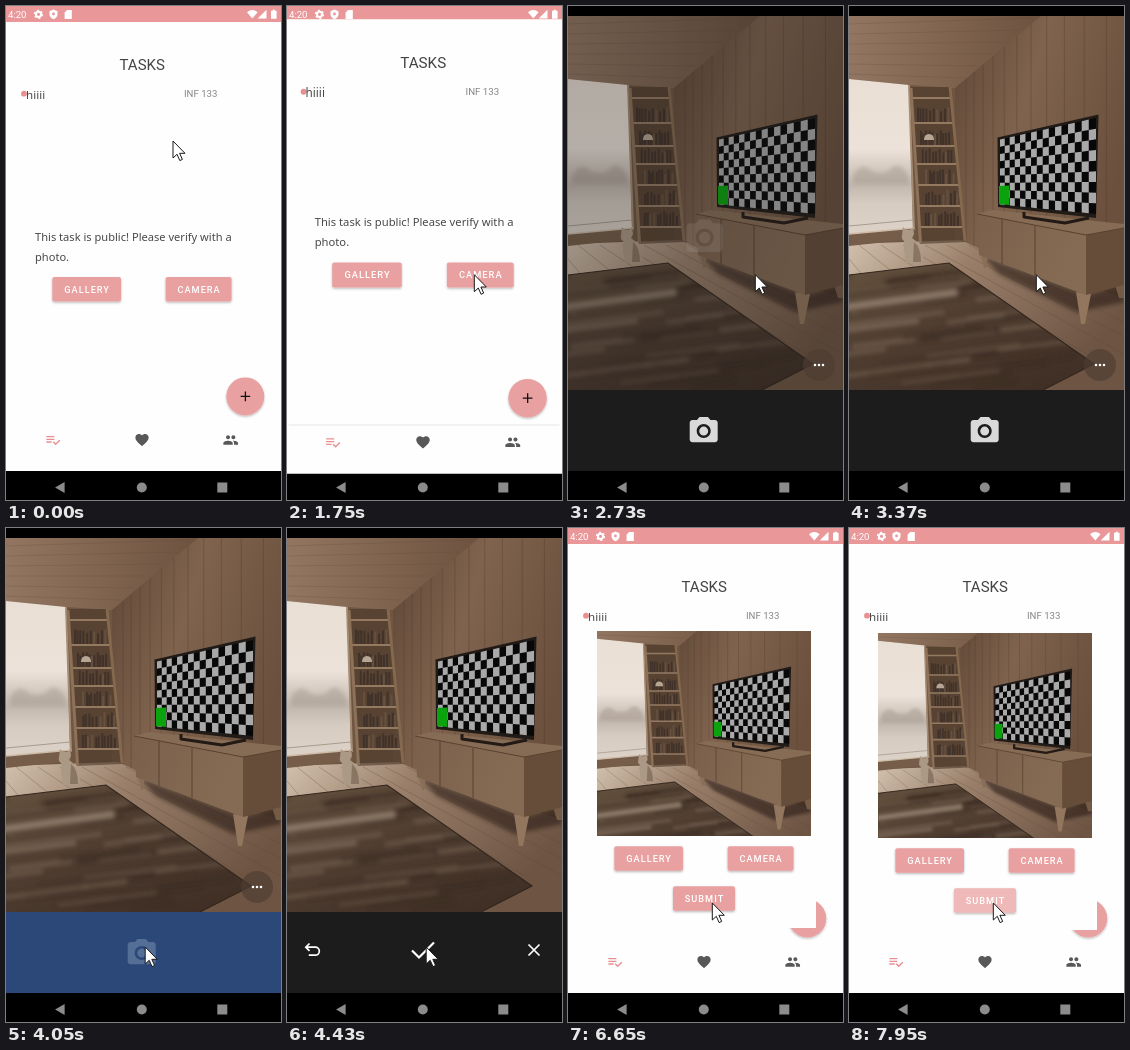
Write an HTML page that moves like this. It is 275 px wide and 494 px high and loops after 8 s.

```html
<!DOCTYPE html>
<html lang="en">
<head>
<meta charset="utf-8">
<title>Tasks</title>
<style>
html, body { margin: 0; width: 100%; height: 100%; overflow: hidden; background: #000; }
svg { display: block; width: 100vw; height: 100vh; font-family: Roboto, sans-serif; }
.body { font: 11.1px "Noto Sans", "Open Sans", sans-serif; fill: #484848; }
.label { font-size: 9.2px; font-weight: 500; letter-spacing: 1px; fill: #fff; text-anchor: middle; }
</style>
</head>
<body>
<svg id="stage" viewBox="0 0 275 494" xmlns="http://www.w3.org/2000/svg">
<defs>
  <filter id="drop" x="-20%" y="-20%" width="140%" height="160%">
    <feDropShadow dx="0" dy="1.2" stdDeviation="1" flood-opacity=".28"/>
  </filter>
  <filter id="soft" x="-20%" y="-20%" width="140%" height="140%"><feGaussianBlur stdDeviation="2"/></filter>
  <linearGradient id="sky" x2="0" y2="1">
    <stop offset="0" stop-color="#eadfd4"/><stop offset=".45" stop-color="#ece2d9"/>
    <stop offset=".6" stop-color="#d0c5bb"/><stop offset=".68" stop-color="#c3b8ae"/>
    <stop offset=".8" stop-color="#d6ccc2"/><stop offset="1" stop-color="#dcd2c8"/>
  </linearGradient>
  <linearGradient id="ceil" x2="1"><stop stop-color="#927661"/><stop offset="1" stop-color="#6d523f"/></linearGradient>
  <linearGradient id="wall" x2="1" y2=".5"><stop stop-color="#5f4736"/><stop offset=".45" stop-color="#7f634e"/><stop offset="1" stop-color="#6a503d"/></linearGradient>
  <linearGradient id="floor" x2="1" y2=".5"><stop stop-color="#d2c1ae"/><stop offset=".4" stop-color="#9a806b"/><stop offset="1" stop-color="#6d5443"/></linearGradient>
  <linearGradient id="front" x2="1" y2=".3"><stop stop-color="#7b614c"/><stop offset="1" stop-color="#866b54"/></linearGradient>
  <linearGradient id="pile" x2=".7" y2="1"><stop stop-color="#66533f"/><stop offset=".5" stop-color="#4f3d31"/><stop offset="1" stop-color="#3f2f25"/></linearGradient>
  <clipPath id="view"><path d="M0 10H275V384H0Z"/></clipPath>
  <clipPath id="rugClip"><path d="M0 269L100 257L245 358L194 384H0Z"/></clipPath>
  <clipPath id="thumb"><path d="M29 103H243V308H29Z"/></clipPath>
  <path id="shot" d="M9 2L7.17 4H4c-1.1 0-2 .9-2 2v12c0 1.1.9 2 2 2h16c1.1 0 2-.9 2-2V6c0-1.1-.9-2-2-2h-3.17L15 2H9zm3 15c-2.76 0-5-2.24-5-5s2.24-5 5-5 5 2.24 5 5-2.24 5-5 5zm0-1.8a3.2 3.2 0 1 0 0-6.4 3.2 3.2 0 0 0 0 6.4z"/>
  <g id="room" clip-path="url(#view)"></g>
</defs>

<path d="M0 0H275V494H0Z"/>

<g id="tasks">
  <path d="M0 0H275V465H0Z" fill="#fefefe"/>
  <path d="M0 0H275V16H0Z" fill="#e99799"/>
  <text x="136.2" y="63.8" font-size="15" text-anchor="middle" fill="#444">TASKS</text>
  <circle cx="18" cy="87.7" r="2.9" fill="#e98f92"/>
  <text class="body" x="20" y="93" style="font-size:11.6px">hiiii</text>
  <text x="178" y="90.5" font-size="9.6" fill="#868686">INF 133</text>
  <path id="rule" d="M3 417H271" stroke="#e8e8e8"/>
  <g filter="url(#drop)"><circle cx="239.3" cy="390.4" r="19" fill="#e9a0a1"/></g>
  <path d="M234.6 390.4h9.6M239.4 385.6v9.6" stroke="#111" stroke-width="1.3"/>
  <path transform="translate(39 426) scale(.667)" fill="#e98f92" d="M14 10H2v2h12v-2zm0-4H2v2h12V6zM2 16h8v-2H2v2zm19.5-4.5L23 13l-6.99 7-4.51-4.5L13 14l3.01 3 5.49-5.5z"/>
  <path transform="translate(128 426) scale(.667)" fill="#585858" d="M12 21.35l-1.45-1.32C5.4 15.36 2 12.28 2 8.5 2 5.42 4.42 3 7.5 3c1.74 0 3.41.81 4.5 2.09C13.09 3.81 14.76 3 16.5 3 19.58 3 22 5.42 22 8.5c0 3.78-3.4 6.86-8.55 11.54L12 21.35z"/>
  <path transform="translate(216.7 426) scale(.667)" fill="#585858" d="M16 11c1.66 0 2.99-1.34 2.99-3S17.66 5 16 5c-1.66 0-3 1.34-3 3s1.34 3 3 3zm-8 0c1.66 0 2.99-1.34 2.99-3S9.66 5 8 5C6.34 5 5 6.34 5 8s1.34 3 3 3zm0 2c-2.33 0-7 1.17-7 3.5V19h14v-2.5c0-2.33-4.67-3.5-7-3.5zm8 0c-.29 0-.62.02-.97.05 1.16.84 1.97 1.97 1.97 3.45V19h6v-2.5c0-2.33-4.67-3.5-7-3.5z"/>
  <g id="content">
    <g id="notice">
      <text class="body" x="29" y="220">This task is public! Please verify with a</text>
      <text class="body" x="29" y="240">photo.</text>
    </g>
    <g id="result">
      <path d="M29 103H248V400H29Z" fill="#fefefe"/>
      <g clip-path="url(#thumb)"><use href="#room" transform="translate(29 54) scale(.778)"/></g>
    </g>
    <g id="buttons"></g>
  </g>
</g>

<g id="status" fill="#fff">
  <text x="2" y="12" font-size="9.6">4:20</text>
  <g fill="none" stroke="#fff">
    <circle cx="32.5" cy="8.3" r="2.6" stroke-width="2"/>
    <circle cx="32.5" cy="8.3" r="4" stroke-width="1.2" stroke-dasharray="2.1"/>
  </g>
  <path d="M47.5 3.6l4 1.6v3c0 2.4-1.7 4.2-4 5-2.3-.8-4-2.6-4-5v-3z"/>
  <circle cx="47.5" cy="8" r="1.4" fill="#e99799"/>
  <path d="M58.6 6.6l2.6-2.6h4.6v9h-7.2z"/>
  <path d="M241 6.2q5.3-4.4 10.6 0l-5.3 6.4z"/>
  <path d="M260.5 3.8v8.8h-8.8z"/>
  <path d="M265 4.8h1.6v-1h2.4v1h1.6v8H265z"/>
</g>

<g id="camera">
  <path d="M0 0H275V494H0Z"/>
  <g id="live"><use href="#room"/></g>
  <path id="cover" fill="#1c1c1c"/>
  <use id="ghost" href="#shot" fill="#b9aea3" transform="translate(115 210) scale(1.8)"/>
  <path id="bar" d="M0 384H275V465H0Z"/>
  <use id="shutter" href="#shot" transform="translate(118.9 408.3) scale(1.4)"/>
  <g id="more">
    <circle cx="251" cy="359" r="16" fill="#4f3e33" opacity=".65"/>
    <path d="M247 359h.01M251 359h.01M255 359h.01" stroke="#fff" stroke-width="2.6" stroke-linecap="round"/>
  </g>
</g>

<g id="review" fill="none" stroke="#fff" stroke-width="1.7">
  <path d="M22.5 415.5l-3.7 3.7 3.7 3.7M19 419.2h9.3a4 4 0 0 1 0 8h-6.5"/>
  <path d="M125 422.5l7 7 15-15" stroke-width="2.2"/>
  <path d="M241.5 416.5l11 11m0-11l-11 11"/>
</g>

<g fill="#8c8c8c">
  <path d="M58.6 476v11l-9.5-5.5z"/><circle cx="135.8" cy="481.5" r="5"/><path d="M211.3 476.5h10v10h-10z"/>
</g>
<path id="cursor" d="M0 0V17L4 13.3L6.8 19.6L9.4 18.4L6.6 12.3H12Z" fill="#fff" stroke="#1a1a1a" stroke-linejoin="round"/>
</svg>

<script>
const $ = id => document.getElementById(id);
const set = (id, attrs) => { for (const k in attrs) $(id).setAttribute(k, attrs[k]); };
const show = (id, on) => set(id, { display: on ? 'inline' : 'none' });
const mix = (a, b, k) => a + (b - a) * k;
const part = (t, a, b) => Math.min(1, Math.max(0, (t - a) / (b - a)));
const smooth = k => k * k * (3 - 2 * k);
const path = (d, fill, extra = '') => `<path d="${d}" fill="${fill}" ${extra}/>`;
const line = (d, color, width = 1, extra = '') => path(d, 'none', `stroke="${color}" stroke-width="${width}" ${extra}`);

let seed = 7;
const rand = () => (seed = seed * 16807 % 2147483647) / 2147483647;

function shelf() {
  let s = path('M62 81L101 81L116 236L71 238Z', '#4a3729', 'opacity=".6"');
  for (const y of [92, 117, 140, 158, 179, 200, 221]) {
    const k = (y - 82) / 154, left = 62 + 9 * k, right = 101 + 15 * k;
    if (y > 95) for (let x = left + 4 + rand() * 5; x < right - 4; x += 2 + rand() * 2.2) {
      const h = 11 + rand() * 5;
      s += path(`M${x} ${y}v${-h}h2v${h}z`, rand() < .8 ? '#40322a' : '#665141');
    }
    s += line(`M${left} ${y}H${right}`, '#957a62', 2);
  }
  return s + path('M75 134q0-6 5-6t5 6z', '#b8a694') +
    line('M62 82L71.5 237', '#8d7159', 3) + line('M101 81L116 235', '#85694f', 2.8);
}

function television() {
  const px = u => 151 + 96 * u * (.78 + .22 * u);
  const py = (u, v) => {
    const k = u * (.78 + .22 * u);
    return mix(mix(133.5, 112, k), mix(198.5, 208, k), v);
  };
  const cols = 16, rows = 9;
  let cells = '';
  for (let i = 0; i < cols; i++) for (let j = 0; j < rows; j++) {
    if ((i + j) % 2) continue;
    const a = i / cols, b = (i + 1) / cols, c = j / rows, d = (j + 1) / rows;
    cells += `M${px(a)} ${py(a, c)}L${px(b)} ${py(b, c)}L${px(b)} ${py(b, d)}L${px(a)} ${py(a, d)}Z`;
  }
  return line('M175 206V211L216 217L240 212', '#231a15', 3, 'stroke-linejoin="round"') +
    path('M148.5 131.5L249.5 108.5L247 212L149 201Z', '#211b18') +
    path('M151 133.5L247 112V208L151 198.5Z', '#080808') + path(cells, '#a9a9a9') +
    path('M150 180L160 179.5V199L150 198Z', '#0aa30d');
}

function rug() {
  let streaks = '';
  for (let i = 0; i < 44; i++) {
    const x = rand() * 230 - 60, y = 266 + rand() * 116, w = 30 + rand() * 70;
    const bright = rand() < .5;
    streaks += line(`M${x} ${y}l${w} ${-w * .13}`, bright ? '#7d6959' : '#382a21', 2 + rand() * 4, 'opacity=".5"');
  }
  streaks += line('M-10 302L108 286', '#9a8776', 7, 'opacity=".75"') +
    line('M-10 325L70 315', '#8a7767', 5, 'opacity=".6"');
  return '<g clip-path="url(#rugClip)">' + path('M0 250H275V384H0Z', 'url(#pile)') +
    `<g filter="url(#soft)">${streaks}</g></g>` +
    line('M0 269L100 257L245 358L194 384', '#33261d', 1.2);
}

function room() {
  let s = path('M0 10H275V384H0Z', '#6f5642') +
    path('M0 10H192L106 82L60 79L0 73Z', 'url(#ceil)');
  for (let i = 0; i < 6; i++)
    s += line(`M0 ${18 + i * 10}L${185 - i * 14} ${12 + i * 12}`, '#5f4a3a', .7, 'opacity=".35"');
  s += path('M106 82L192 10H275V300L106 236Z', 'url(#wall)');
  for (let x = 117, step = 8; x < 275; x += step, step *= 1.12)
    s += line(`M${x} ${Math.max(10, 82 - (x - 106) * .84)}V270`, '#4d3828', .8, 'opacity=".4"');
  s += path('M0 238L112 234L140 247L275 292V384H0Z', 'url(#floor)');
  for (let i = 0; i < 7; i++)
    s += line(`M${i * 22 - 12} 239L${i * 66 + 40} ${300 + i * 16}`, '#5e4838', .8, 'opacity=".4"');
  s += path('M0 73L60 79L64 222L0 229Z', 'url(#sky)') +
    path('M4 170q8-16 20-4q14 3 18-4q10-8 18 10v6H4z', '#93877e', 'opacity=".35" filter="url(#soft)"') +
    line('M60 79L65 224', '#a58c75', 2) + line('M0 220L64 214', '#a99b8e', 1) +
    path('M0 228L65 222V233L0 240Z', '#755d49') + line('M0 228L65 222', '#cdbba8', 1.6) +
    shelf() + rug();
  // cat
  s += path('M54 221l3 3h4l3-3 1 7-2 4q8 5 9 14l3 7-5 4H57l-2-14q1-6 0-8-3-2-2-6z', '#ab9985') +
    path('M65 236q7 6 7 20h-8z', '#8a7462');
  // cabinet
  s += path('M132 249L237 289L275 278V296L228 306L150 268Z', '#2a1d15', 'opacity=".6" filter="url(#soft)"') +
    path('M132 247L139 248L137 262H135Z', '#8a6e57') + path('M227 286L242 288L236 318H232Z', '#92765e') +
    path('M266 279L275 278V292H270Z', '#745b46') +
    path('M128 208L143 204L275 218V225L238 229Z', '#876c55') +
    path('M128 208L237 229V289L130 249Z', 'url(#front)') +
    path('M237 229L275 222V279L237 289Z', '#664d3a') +
    line('M153 213V258M186 220V270M128 208L237 229L275 222', '#543f2e', .9);
  return s + television();
}

function button(id, x, y, w, label) {
  return `<g id="${id}"><rect x="${x}" y="${y}" width="${w}" height="24.6" rx="2" fill="#e9a0a1" filter="url(#drop)"/>
    <rect id="${id}Press" x="${x}" y="${y}" width="${w}" height="24.6" rx="2" fill="#fff" opacity="0"/>
    <text class="label" x="${x + w / 2 + .5}" y="${y + 15.8}">${label}</text></g>`;
}

$('room').innerHTML = room();
$('buttons').innerHTML = button('gallery', 46.3, 256.4, 68.7, 'GALLERY') +
  button('snap', 159.6, 256.4, 66, 'CAMERA') + button('submit', 105, 296.4, 62, 'SUBMIT');

// bursts of screen updates: first, last, count
const bursts = [[60, 850, 13], [910, 1030, 3], [1270, 1390, 3], [1570, 1750, 4], [1870, 1990, 2],
  [2610, 2730, 3], [2820, 3370, 9], [3440, 4050, 11], [4110, 4230, 3], [4430, 4430, 1],
  [5630, 5930, 6], [6290, 6650, 7], [7820, 7950, 3]];
function snap(t) {
  let last = 0;
  for (const [a, b, n] of bursts) {
    if (t < a) break;
    const step = (b - a) / (n - 1 || 1);
    last = step ? a + Math.min(n - 1, Math.floor((t - a) / step + 1e-6)) * step : a;
  }
  return last;
}

const moves = [[0, 850, 167, 135, 185, 262], [850, 1030, 185, 262, 187.3, 268.7],
  [3380, 3930, 187.3, 268.7, 139.2, 419], [6230, 6650, 139.2, 419, 144.3, 375]];
function cursorAt(t) {
  let at = [167, 135];
  for (const [a, b, x, y, u, v] of moves) {
    if (t < a) break;
    const k = smooth(part(t, a, b));
    at = [mix(x, u, k), mix(y, v, k)];
  }
  return at;
}

const zoom = s => `translate(136.5 247) scale(${s}) translate(-136.5 -247)`;

function draw(time) {
  const t = snap(time);
  const opening = part(t, 1570, 1990), closing = part(t, 5570, 5930);
  const done = t >= 5500, cameraOn = t > 1760 && t < 5925;

  // task page
  const pageZoom = done ? 1 + .094 * (1 - closing) : 1 + .04 * opening ** 1.4;
  set('tasks', { transform: zoom(pageZoom) });
  show('tasks', t < 1985 || done);
  show('rule', opening > 0 && !done);
  show('notice', !done);
  show('result', done);
  show('submit', done);
  const drift = done ? 2 * part(t, 7820, 7950) : 14.5 * (1 - part(t, 0, 300)) ** 2;
  set('content', { transform: `translate(0 ${drift})` });
  set('buttons', { transform: `translate(0 ${done ? 61.8 : 0})` });
  set('snapPress', { opacity: t >= 1270 && t < 1570 ? .12 + .13 * part(t, 1270, 1390) : 0 });
  set('submitPress', { opacity: t >= 7820 ? .08 + .17 * part(t, 7820, 7950) : 0 });
  show('status', !cameraOn);

  // camera page
  show('camera', cameraOn);
  const alpha = done ? .7 * (1 - part(t, 5630, 5930)) : part(t, 1750, 1990) ** .7;
  set('camera', {
    opacity: alpha,
    transform: zoom(done ? 1 - .09 * closing : mix(.94, 1, part(t, 1750, 1990)))
  });
  const ready = t >= 2609, reviewing = t >= 4430, pressed = t >= 3980 && !reviewing;
  show('live', ready);
  set('cover', {
    d: ready ? 'M0 10H275V384H0Z' : 'M0 0H275V384H0Z',
    opacity: ready ? .4 * (1 - part(t, 2550, 3370)) ** 1.7 : 1
  });
  set('ghost', { opacity: ready ? .28 * (1 - part(t, 2550, 3000)) : 0 });
  set('bar', { fill: pressed ? '#2b4878' : '#1c1c1c' });
  set('shutter', { fill: pressed ? '#7f93b3' : '#d9d9d9', opacity: pressed ? .5 : 1 });
  show('shutter', ready && !reviewing);
  show('more', ready && !reviewing);
  show('review', reviewing && cameraOn);
  set('review', { opacity: done ? 1 - part(t, 5630, 5930) : 1 });

  const [x, y] = cursorAt(t);
  set('cursor', { transform: `translate(${x} ${y})` });
}

const start = performance.now();
function tick() {
  draw((performance.now() - start) % 8000);
  requestAnimationFrame(tick);
}
tick();
</script>
</body>
</html>
```
